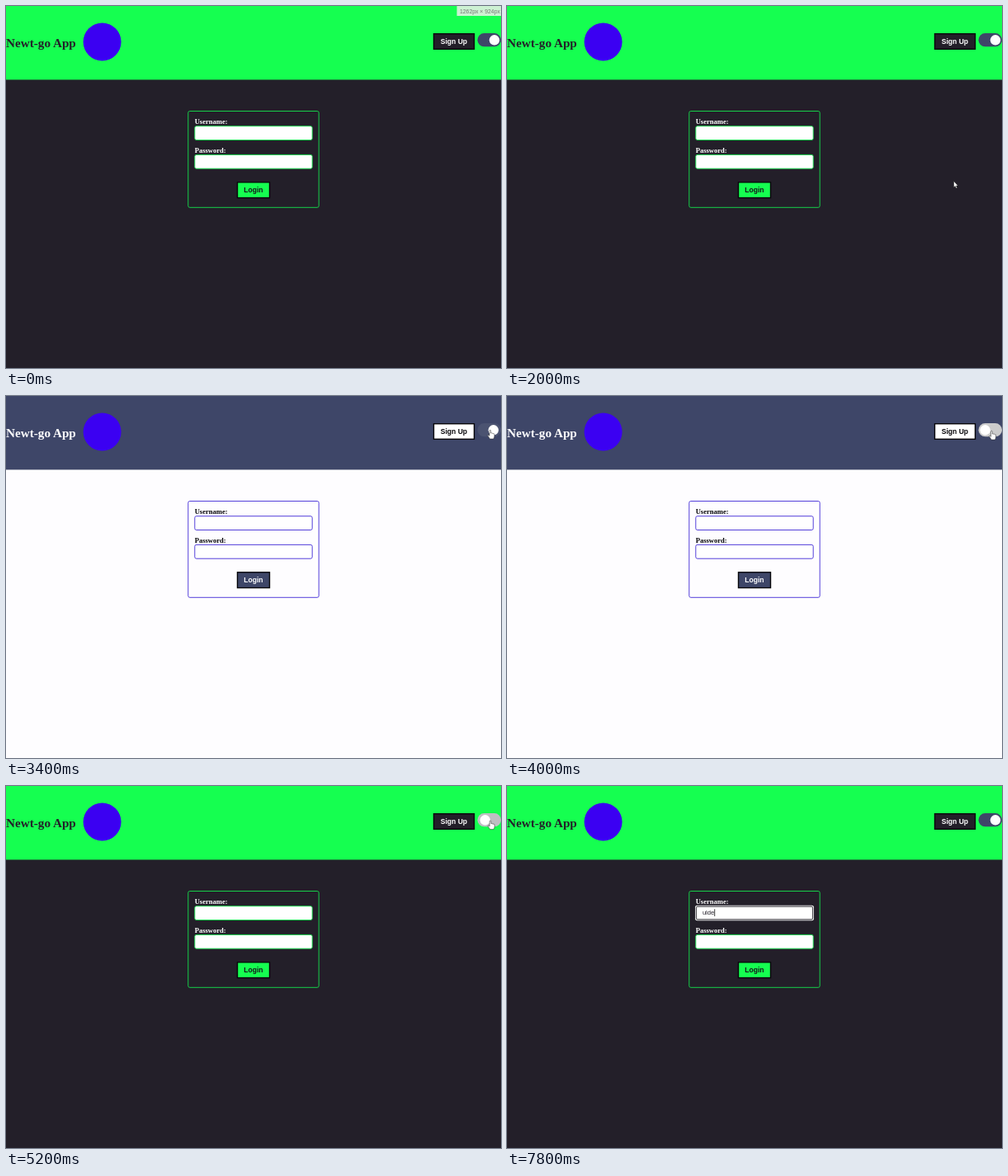
An HTML page for the animation above (8 s loop, 600x439 px).

```html
<!DOCTYPE html>
<html lang="en">
<head>
<meta charset="utf-8">
<title>Newt-go App</title>
<style>
  html, body { margin: 0; width: 100%; height: 100%; overflow: hidden; }
  svg { display: block; width: 100vw; height: 100vh; }
  .serif { font-family: "Liberation Serif", "Times New Roman", serif; font-weight: bold; }
  .sans { font-family: "Liberation Sans", Arial, sans-serif; }
  .bold { font-weight: bold; }
  svg {
    --page: #231f29; --head: #15ff50; --title: #231f29; --label: #fff;
    --line: #17d84b; --btn: #15ff50; --btnText: #17141c;
    --nav: #231f29; --navText: #fff; --edge: #08070a;
  }
  svg.light {
    --page: #fefdff; --head: #3e4668; --title: #fff; --label: #08070a;
    --line: #4a35d8; --btn: #3e4668; --btnText: #fff;
    --nav: #fff; --navText: #08070a;
  }
  .box { fill: #fff; stroke: var(--line); stroke-width: .95; }
  .btn { stroke: var(--edge); stroke-width: 1.4; }
</style>
</head>
<body>
<svg id="app" viewBox="0 0 600 439">
  <rect width="600" height="439" fill="var(--page)"/>
  <rect width="600" height="89.4" fill="var(--head)"/>
  <text class="serif" x="0" y="50" font-size="15.2" fill="var(--title)">Newt-go App</text>
  <circle cx="116.6" cy="43.5" r="23" fill="#3b00f2"/>

  <rect class="btn" x="518.5" y="33.7" width="49" height="18.6" fill="var(--nav)"/>
  <text class="sans bold" x="526.8" y="45.8" font-size="8.56" fill="var(--navText)">Sign Up</text>
  <rect id="track" x="571.5" y="33.1" width="28.5" height="16.2" rx="8.1"/>
  <circle id="knob" cy="41.3" r="6.2" fill="#fff"/>

  <rect x="220.8" y="127.5" width="158.4" height="116.8" rx="2" fill="none" stroke="var(--line)" stroke-width=".95"/>
  <text class="serif" x="228.7" y="143" font-size="8.56" fill="var(--label)">Username:</text>
  <rect class="box" x="228.8" y="145.7" width="142.4" height="16.8" rx="2"/>
  <text class="serif" x="228.7" y="177.6" font-size="8.56" fill="var(--label)">Password:</text>
  <rect class="box" x="228.8" y="180.4" width="142.4" height="16.8" rx="2"/>
  <rect class="btn" x="280.5" y="213.8" width="39" height="18.8" fill="var(--btn)"/>
  <text class="sans bold" x="288.3" y="225.9" font-size="8.56" fill="var(--btnText)">Login</text>

  <g id="focus">
    <rect x="228" y="144.8" width="144" height="18.4" rx="2.6" fill="#fff"/>
    <rect x="229.3" y="146.1" width="141.4" height="15.8" rx="1.6" fill="#fff" stroke="#17141c" stroke-width=".95"/>
    <text id="typed" class="sans" x="236.9" y="156.4" font-size="7.6" fill="#26222c"></text>
    <rect id="caret" y="149.3" width=".8" height="8.7" fill="#111"/>
  </g>

  <g id="size">
    <rect x="546.5" width="53.5" height="12" fill="#cdf1d3"/>
    <text class="sans" x="550" y="8.7" font-size="6.85" fill="#737873">1262px × 924px</text>
  </g>

  <path id="arrow" d="M0 0V7.6L1.7 6.1L2.9 8.8L4.2 8.2L3 5.7H5.2Z" fill="#fff" stroke="#111" stroke-width=".5"/>
  <path id="hand" d="M-1 .8Q-1 0 -.2 0T.7 .8V3.6Q1.5 3.1 2.2 3.9Q3 3.4 3.6 4.2Q5 4 5 5.3V7.6Q4.7 9 4 10.6H-.6Q-1 9.3 -3 6.9Q-3.4 5.7 -2.2 5.8L-1 6.9Z" fill="#fff" stroke="#222" stroke-width=".5"/>
</svg>
<script>
const LOOP = 8000, STEP = 200;
const FADE = 400, TO_LIGHT = 3360, TO_DARK = 5160;
const $ = id => document.getElementById(id);
const app = $("app"), typed = $("typed");

// Pointer stops: time, x, y
const arrowPath = [[2000, 541.5, 212.3], [2200, 565.8, 135], [2400, 568.8, 122], [2600, 574.5, 55.3]];
const handPath = [[2800, 588.6, 43.5], [3000, 587, 42], [3400, 587, 41.4], [4000, 587.6, 42.4],
                  [5200, 587.2, 42], [5800, 586, 45.3]];

const show = (el, on) => el.setAttribute("visibility", on ? "inherit" : "hidden");
const mix = (a, b, p) => `rgb(${a.map((v, i) => Math.round(v + (b[i] - v) * p))})`;

// CSS "ease" curve, cubic-bezier(.25, .1, .25, 1)
function ease(x) {
  if (x <= 0) return 0;
  if (x >= 1) return 1;
  let lo = 0, hi = 1, s;
  for (let i = 0; i < 20; i++) {
    s = (lo + hi) / 2;
    const bx = .75 * s * (1 - s) + s ** 3;
    if (bx < x) lo = s; else hi = s;
  }
  return .3 * s * (1 - s) ** 2 + 3 * s * s * (1 - s) + s ** 3;
}

function point(el, path, t, end) {
  const on = t >= path[0][0] && t < end;
  show(el, on);
  if (!on) return;
  const [, x, y] = path.filter(p => p[0] <= t).pop();
  el.setAttribute("transform", `translate(${x} ${y})`);
}

function draw(time) {
  const t = Math.floor((time % LOOP) / STEP) * STEP;
  app.classList.toggle("light", t >= 3400 && t < 5200);
  show($("size"), t < 1000);

  const off = ease((t - TO_LIGHT) / FADE) - ease((t - TO_DARK) / FADE);
  $("knob").setAttribute("cx", 592 - 12.4 * off);
  $("track").setAttribute("fill", mix([62, 70, 104], [204, 204, 204], off));

  show($("focus"), t >= 6400);
  const count = Math.max(0, (t - 7400) / 100);
  typed.textContent = "ulde".slice(0, count);
  $("caret").setAttribute("x", 237 + (count ? typed.getComputedTextLength() : 0));
  show($("caret"), t >= 6400 && (t < 7000 || t >= 7400));

  point($("arrow"), arrowPath, t, 2800);
  point($("hand"), handPath, t, 6000);
}

const start = performance.now();
function tick() {
  draw(performance.now() - start);
  requestAnimationFrame(tick);
}
tick();
</script>
</body>
</html>
```
